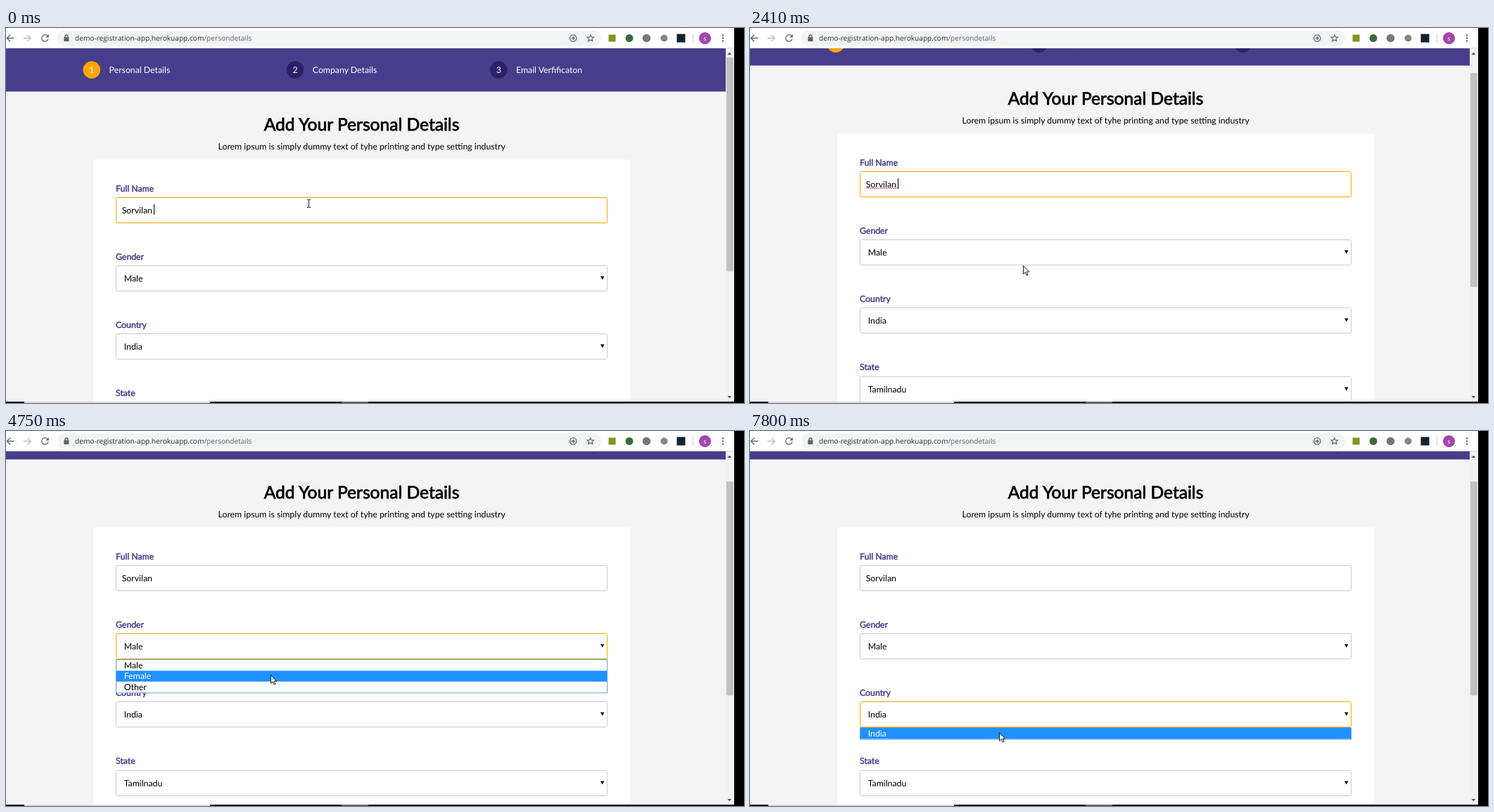
Recreate the animation shown at these times as an HTML page. Size 1049 px wide and 534 px high, loop 8000 ms.

```html
<!DOCTYPE html>
<html lang="en">
<head>
<meta charset="utf-8">
<title>Registration form</title>
<style>
  html, body { margin: 0; width: 100%; height: 100%; overflow: hidden; background: #fff; }
  svg { display: block; }
  text { font: 12.29px Lato, sans-serif; text-rendering: geometricPrecision; }
  .mid { text-anchor: middle; }
  .light { fill: #fff; }
  .title { font-size: 24.58px; stroke: #000; stroke-width: .78px; }
  .label { fill: #483d8b; stroke: #483d8b; stroke-width: .47px; }
  .url { font: 10.13px "Open Sans", "Noto Sans", sans-serif; fill: #2b2d30; }
  .url tspan { fill: #5f6368; }
  .icon { fill: none; stroke: #5f6368; stroke-width: 1.3; }
  .field { fill: #fff; stroke: #ccc; }
  .field.focus { stroke: #ffa500; }
  .popup { fill: #fff; stroke: #6f9bdc; }
  .hover { fill: #1e90ff; }
</style>
</head>
<body>
<svg width="1049" height="534" viewBox="0 0 1049 534">
  <rect width="1049" height="534" fill="#fff"/>

  <svg y="29" width="1023" height="503" viewBox="0 29 1023 503">
    <rect y="29" width="1023" height="503" fill="#f4f4f4"/>
    <g id="page">
      <rect y="-30" width="1023" height="120.5" fill="#483d8b"/>
      <rect x="124" y="187.5" width="763.5" height="500" fill="#fff"/>
      <text class="mid title" x="505.5" y="146">Add Your Personal Details</text>
      <text class="mid" x="505.7" y="173.4">Lorem ipsum is simply dummy text of tyhe printing and type setting industry</text>
      <g id="steps"></g>
      <g id="fields"></g>
      <path id="squiggle" fill="none" stroke="#e03030" stroke-width=".8"/>
      <path id="caret" d="M210.5 251V266" stroke="#000"/>
    </g>
    <g id="gender"></g>
    <g id="country"></g>
  </svg>

  <g id="scrollbar">
    <rect x="1023" y="29" width="12" height="503" fill="#f1f1f1"/>
    <rect id="thumb" x="1024" y="42" width="10" height="304.5" fill="#c1c1c1"/>
    <path d="M1025.5 38l2.8-3.2 2.8 3.2zM1025.5 524l2.8 3.2 2.8-3.2z" fill="#505050"/>
  </g>

  <g id="toolbar">
    <path d="M0 28.5H1035" stroke="#e2e2e2"/>
    <path class="icon" d="M11.5 14.5H1.5M6 9.8L1.3 14.5 6 19.2"/>
    <path class="icon" style="stroke:#bcbec1" d="M25 14.5H35M30.5 9.8L35.2 14.5 30.5 19.2"/>
    <path class="icon" d="M59 11.3A4.7 4.7 0 1 0 60 15.7"/>
    <path d="M60.8 9V13.6H56.2z" fill="#5f6368"/>
    <rect x="73" y="3.5" width="773" height="22" rx="11" fill="#f1f3f4"/>
    <rect x="82.3" y="13" width="7.2" height="6" rx=".8" fill="#5f6368"/>
    <path class="icon" d="M83.9 13.5V12A2 2 0 0 1 87.9 12V13.5"/>
    <text class="url" x="98" y="18">demo-registration-app.herokuapp.com<tspan>/persondetails</tspan></text>
    <circle class="icon" cx="806.2" cy="14.5" r="4.7"/>
    <path class="icon" d="M803.6 14.5h5.2M806.2 11.9v5.2"/>
    <path id="star" class="icon" style="stroke-width:1.1"/>
    <rect x="856.5" y="9.5" width="10" height="10" fill="#7a9a1e"/>
    <circle cx="886" cy="14.5" r="5.5" fill="#3c6b3a"/>
    <circle cx="910.5" cy="14.5" r="5.8" fill="#777"/>
    <circle cx="935.5" cy="14.5" r="5" fill="#858585"/>
    <rect x="953.5" y="8.5" width="12" height="12" fill="#14202f"/>
    <path d="M976.5 8V21" stroke="#d0d2d5"/>
    <circle cx="993.5" cy="14.5" r="8.6" fill="#a347ad"/>
    <text class="mid light" x="993.5" y="17.5" style="font-size:9px">s</text>
    <g fill="#5f6368">
      <circle cx="1019" cy="10.5" r="1.2"/><circle cx="1019" cy="14.5" r="1.2"/><circle cx="1019" cy="18.5" r="1.2"/>
    </g>
  </g>

  <path d="M0 533H1035" stroke="#1b1b1b" stroke-width="2"/>
  <path d="M26 533H290" stroke="#dcdcdc" stroke-width="2"/>
  <path d="M477 533H515" stroke="#666" stroke-width="2"/>
  <rect x="1035" width="14" height="534" fill="#000"/>

  <path id="arrow" d="M.5 .7V12.3L3.2 9.8 5.1 14.2 7 13.4 5.2 9.1H8.7z" fill="#fff" stroke="#000" stroke-width=".9"/>
  <path id="beam" d="M-2.5-5.5h2l.5.5.5-.5h2M-2.5 5.5h2l.5-.5.5.5h2M0-5V5" fill="none" stroke="#222"/>
</svg>

<script>
const LOOP = 8000, PITCH = 97.3, ROW = 15.4;
const $ = id => document.getElementById(id);
// text centred vertically on y
const text = (x, y, s, cls = '') => `<text class="${cls}" x="${x}" y="${y + 4.5}">${s}</text>`;
const show = (el, on) => el.setAttribute('visibility', on ? 'visible' : 'hidden');
const move = (el, x, y) => el.setAttribute('transform', `translate(${x} ${y})`);
const within = (t, a, b) => t >= a && t < b;

$('steps').innerHTML = ['Personal Details', 'Company Details', 'Email Verfificaton'].map((s, i) => {
  const x = 121.8 + 289.2 * i;
  return `<circle cx="${x}" cy="59.6" r="12.3" fill="${i ? '#2c2168' : '#ffa500'}"/>`
    + text(x, 59.6, i + 1, 'mid light') + text(x + 24.8, 59.3, s, 'light');
}).join('');

$('fields').innerHTML = [
  ['Full Name', 'Sorvilan'], ['Gender', 'Male'], ['Country', 'India'], ['State', 'Tamilnadu']
].map(([label, value], i) => {
  const dy = PITCH * i, top = Math.round(240.8 + dy) + .5;
  return text(156, 228 + dy, label, 'label')
    + `<rect class="field" x="156.5" y="${top}" width="698" height="36" rx="2"/>`
    + text(i ? 167.7 : 164.7, 259.2 + dy, value)
    + (i ? `<path d="M845 ${top + 15}h5.4l-2.7 5z"/>` : '');
}).join('');
const fields = document.querySelectorAll('.field');

function popup(id, top, items) {
  const h = items.length * ROW;
  $(id).innerHTML = `<rect class="popup" x="156.5" y="${top + .5}" width="698" height="${h + 1.2}"/>`
    + `<rect class="hover" x="157" y="${top + 1}" width="697" height="${ROW}"/>`
    + items.map((s, i) => text(167.7, top + 8.5 + ROW * i, s)).join('');
  const bar = $(id).querySelector('.hover'), labels = $(id).querySelectorAll('text');
  return (open, row) => {
    show($(id), open);
    bar.setAttribute('y', top + 1 + ROW * row);
    labels.forEach((el, i) => el.setAttribute('class', i === row ? 'light' : ''));
  };
}
const setGender = popup('gender', 325, ['Male', 'Female', 'Other']);
const setCountry = popup('country', 422, ['India']);

$('squiggle').setAttribute('d', 'M165 266' + 'l1.5-1.6 1.5 1.6'.repeat(15));
$('star').setAttribute('d', 'M' + Array.from({length: 10}, (_, i) => {
  const a = Math.PI * (i / 5 - .5), r = i % 2 ? 2.2 : 5;
  return `${830.8 + r * Math.cos(a)} ${14.7 + r * Math.sin(a)}`;
}).join('L') + 'z');

// pointer moves: start, end, steps, x, y
const moves = [
  [690, 930, 4, 380, 348], [1080, 1080, 1, 380, 345], [1710, 1860, 3, 385, 339],
  [2010, 2090, 2, 388, 338], [2660, 2880, 4, 389, 318], [3110, 3110, 1, 388, 317],
  [3660, 3660, 1, 387, 325], [3820, 4120, 5, 374, 355], [4750, 4750, 1, 376, 347],
  [4830, 4980, 3, 379, 344], [5290, 5600, 5, 381, 337], [6230, 6770, 8, 361, 413],
  [7550, 7800, 4, 354, 429]
];
// page offset held from each time on
const scrolls = [
  [0, 0], [1320, 6], [1400, 15], [1470, 20], [1550, 21.5],
  [2330, 27], [2410, 37], [2490, 45], [2570, 49], [2660, 50]
];

function pointer(t) {
  let x = 430.5, y = 250;
  for (const [a, b, n, tx, ty] of moves) {
    if (t < a) break;
    const done = n > 1 ? Math.floor((t - a) / (b - a) * (n - 1) + 1e-6) + 1 : 1;
    const k = Math.min(1, done / n);
    x += (tx - x) * k;
    y += (ty - y) * k;
  }
  return [x, y];
}

function draw(t) {
  const offset = scrolls.findLast(s => s[0] <= t)[1];
  move($('page'), 0, -offset);
  $('thumb').setAttribute('y', 42 + offset * .6);

  const active = t < 3260 ? 0 : t < 7020 ? 1 : 2;
  fields.forEach((el, i) => el.classList.toggle('focus', i === active));
  show($('squiggle'), within(t, 1320, 3260));
  show($('caret'), t < 510 || within(t, 1320, 1550) || within(t, 2050, 2570) || within(t, 3110, 3260));

  const [x, y] = pointer(t), beam = t < 770;
  move($('beam'), x, y);
  move($('arrow'), Math.round(x), Math.round(y));
  show($('beam'), beam);
  show($('arrow'), !beam && !within(t, 3340, 3660));

  const row = Math.max(0, Math.min(2, Math.floor((y - 326) / ROW)));
  setGender(within(t, 3660, 5930), row);
  setCountry(t >= 7095, 0);
}

function tick() {
  draw(performance.now() % LOOP);
  requestAnimationFrame(tick);
}
tick();
</script>
</body>
</html>
```
